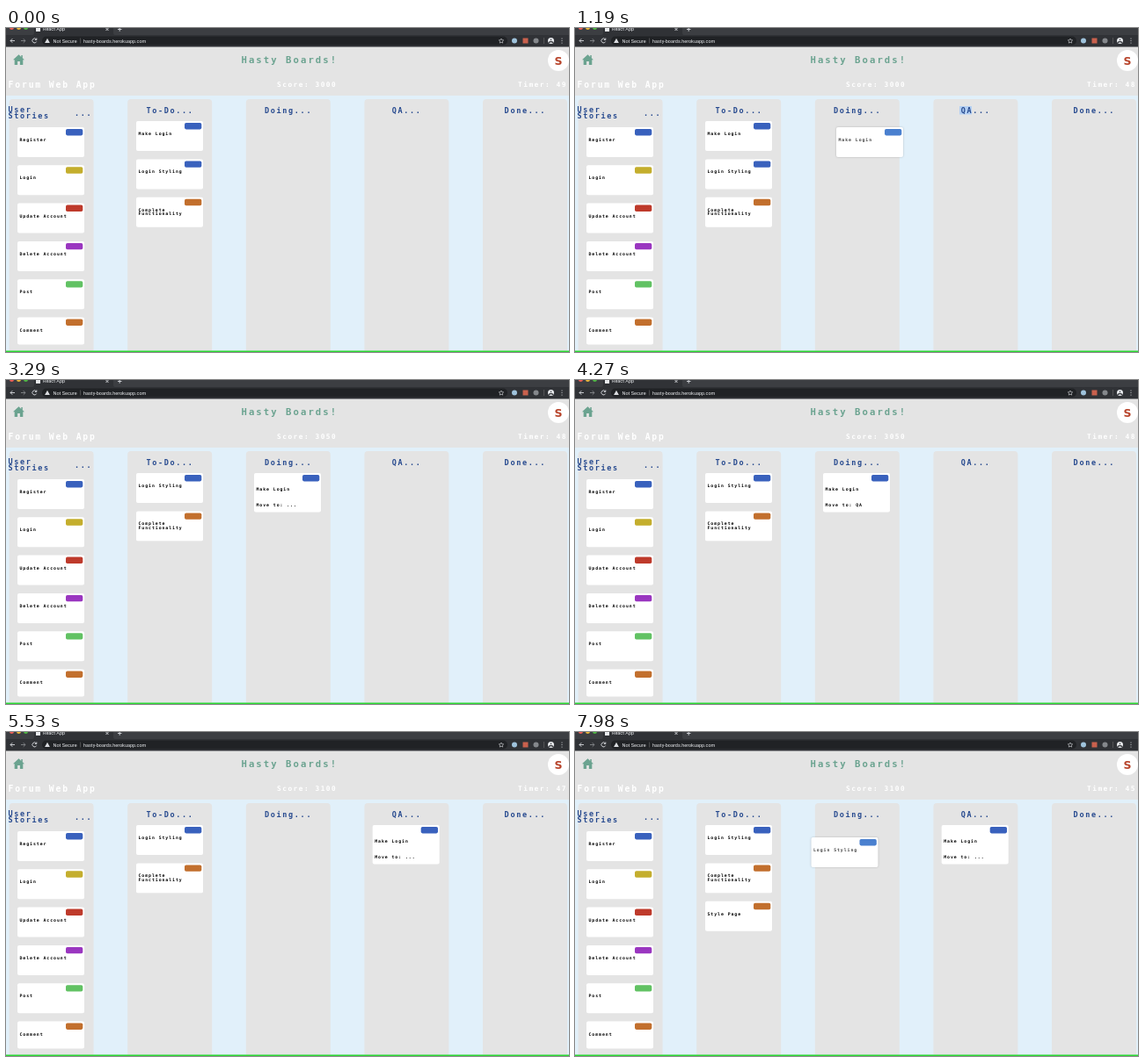
Animation, 640 px wide and 369 px high, one loop 8 s. Source, as an HTML page:

```html
<!DOCTYPE html>
<html lang="en">
<head>
<meta charset="utf-8">
<title>Task board</title>
<style>
html, body { margin: 0; width: 100%; height: 100%; overflow: hidden; background: #e1f0fa; }
svg { display: block; width: 100vw; height: 100vh; }
text { font: bold 4.85px "DejaVu Sans Mono", monospace; letter-spacing: .194em; white-space: pre; }
.ui { font: 5.5px Roboto, Arial, sans-serif; letter-spacing: 0; fill: #e8eaed; }
.brand { font-size: 10.6px; fill: #6ba390; }
.project { font-size: 9.7px; fill: #fff; }
.stat { font-size: 7.8px; fill: #fff; }
.heading { font-size: 8.5px; fill: #274a8f; }
.avatar { font: bold 12.5px "DejaVu Sans", sans-serif; letter-spacing: 0; fill: #b8452c; }
.ghost { filter: drop-shadow(0 0 1px #0003); }
.ghost text { fill: #444; }

.anim { animation: 8s step-end infinite; }
.drag { animation-timing-function: ease-in-out; }

/* Cards in the columns */
#first { animation-name: first; }
#rest { animation-name: rest; }
#added { animation-name: added; }
#doing { animation-name: doing; }
#qa { animation-name: qa; }
@keyframes first { 0% { visibility: visible } 18.2%, 100% { visibility: hidden } }
@keyframes rest { 0% { transform: none } 18.2%, 100% { transform: translateY(-43.4px) } }
@keyframes added { 0% { visibility: hidden } 79%, 100% { visibility: visible } }
@keyframes doing { 0% { visibility: hidden } 18.2% { visibility: visible } 62%, 100% { visibility: hidden } }
@keyframes qa { 0% { visibility: hidden } 62%, 100% { visibility: visible } }

/* Labels */
#wait { animation-name: wait; }
#ready { animation-name: ready; }
#mark { animation-name: mark; }
@keyframes wait { 0% { opacity: 1 } 45%, 100% { opacity: 0 } }
@keyframes ready { 0% { opacity: 0 } 45%, 100% { opacity: 1 } }
@keyframes mark { 0% { opacity: 0 } 7% { opacity: 1 } 18.2%, 100% { opacity: 0 } }

/* Dragged copies */
#drag1 { animation-name: drag1; }
#drag2 { animation-name: drag2; }
#drag3 { animation-name: drag3; }
@keyframes drag1 {
  0%, 6.99% { visibility: hidden; transform: translate(148px, 106px) }
  7% { visibility: visible; transform: translate(148px, 106px) }
  14.875%, 18.19% { visibility: visible; transform: translate(297px, 113px) }
  18.2%, 100% { visibility: hidden; transform: translate(297px, 113px) }
}
@keyframes drag2 {
  0%, 54.99% { visibility: hidden; transform: translate(282px, 106px) }
  55% { visibility: visible; transform: translate(282px, 106px) }
  61.99% { visibility: visible; transform: translate(425px, 113px) }
  62%, 100% { visibility: hidden; transform: translate(425px, 113px) }
}
@keyframes drag3 {
  0%, 91.99% { visibility: hidden; transform: translate(148px, 106px) }
  92% { visibility: visible; transform: translate(148px, 106px) }
  99.75%, 100% { visibility: visible; transform: translate(268.5px, 120px) }
}
</style>
</head>
<body>
<svg viewBox="0 0 640 369" preserveAspectRatio="none">
  <rect width="640" height="369" fill="#e1f0fa"/>

  <g id="browser">
    <rect width="640" height="22" fill="#3c3e42"/>
    <path d="M30 8q2 0 2-3V0h90v5q0 3 2 3H640V22H0V8z" fill="#303236"/>
    <rect x="41" y="9.5" width="529" height="10" rx="5" fill="#202225"/>
    <circle cx="6.5" cy="-.5" r="2.5" fill="#ee5f57"/>
    <circle cx="14.5" cy="-.5" r="2.5" fill="#e9b63a"/>
    <circle cx="22.5" cy="-.5" r="2.5" fill="#4fb844"/>
    <rect x="34" y="0" width="5" height="4" fill="#e8eaed"/>
    <text class="ui" x="42" y="3">React App</text>
    <g fill="none" stroke="#dadce0" stroke-width=".9">
      <path d="M113.5 0l3 3m0-3l-3 3M127 1.5h4.5M129.2 0v3.8"/>
      <path d="M10 14.5H5m2.3-2.3L5 14.500l2.3 2.3"/>
      <path d="M17 14.5h5m-2.3-2.3l2.3 2.3-2.3 2.3" stroke="#85888c"/>
      <path d="M34.5 13a2.5 2.5 0 1 0 .2 2.5M34.8 11.5v2h-2"/>
      <path d="M563 12l.8 1.7 1.9.2-1.4 1.3.4 1.9-1.7-.9-1.7.9.4-1.9-1.4-1.3 1.9-.2z" stroke-width=".6"/>
      <path d="M84.5 11.5v6M611.5 11v7" stroke="#777" stroke-width=".5"/>
    </g>
    <path d="M47 11.8l2.9 5.2h-5.8z" fill="#dadce0"/>
    <text class="ui" x="53.5" y="16.5">Not Secure</text>
    <text class="ui" x="88" y="16.5">hasty-boards.herokuapp.com</text>
    <circle cx="578" cy="14.5" r="3" fill="#9fc3dc"/>
    <rect x="587.5" y="11.5" width="6" height="6" fill="#c9614d"/>
    <circle cx="602.5" cy="14.5" r="3" fill="#85888c"/>
    <circle cx="619.5" cy="14.5" r="3.5" fill="#e8eaed"/>
    <path d="M617.3 16.5q2.200-2 4.400 0M619.5 13.200v.01" stroke="#3c3e42" stroke-width="1.5" stroke-linecap="round" fill="none"/>
    <path d="M632 12v.01M632 14.5v.01M632 17v.01" stroke="#dadce0" stroke-width="1.2" stroke-linecap="round"/>
  </g>

  <rect y="21.5" width="640" height="55.5" fill="#e4e4e4"/>
  <path d="M14.5 30.3L8 36.3h1.700v5.7h3.4v-3.9h2.8V42h3.4v-5.7H21l-2.2-2V31h-1.5v2z" fill="#6ba390"/>
  <text class="brand" x="267.5" y="40.2">Hasty Boards!</text>
  <circle cx="628" cy="37" r="12" fill="#fff"/>
  <text class="avatar" x="628" y="41.5" text-anchor="middle">S</text>
  <text class="project" x="2.5" y="67.8">Forum Web App</text>
  <text class="stat" x="308" y="67.2" id="score"></text>
  <text class="stat" x="582" y="67.2" id="timer"></text>

  <g id="columns"></g>
  <g id="board"></g>
  <rect y="367.5" width="640" height="1.5" fill="#2bd631"/>
</svg>

<script>
const NS = "http://www.w3.org/2000/svg";
const $ = id => document.getElementById(id);
const board = $("board"), columns = $("columns");
const colors = {
  blue: "#3961bd", lightBlue: "#4a80cf", yellow: "#c4ae2d", red: "#be3a2b",
  purple: "#9a36c0", green: "#61c263", orange: "#c26f2d"
};
const PITCH = 43.4;

function add(parent, tag, attrs = {}, content = "") {
  const el = document.createElementNS(NS, tag);
  for (const key in attrs) el.setAttribute(key, attrs[key]);
  el.textContent = content;
  parent.append(el);
  return el;
}

const group = (id, cls = "anim", parent = board) => add(parent, "g", { id, class: cls });

function card(parent, x, y, color, lines, height = 34) {
  const g = add(parent, "g", { transform: `translate(${x} ${y})` });
  add(g, "rect", { width: 76, height, rx: 2, fill: "#fff" });
  add(g, "rect", { x: 55, y: 2, width: 19.3, height: 7.4, rx: 1.8, fill: colors[color] });
  const top = height > 34 ? 20.1 : 16;
  lines.forEach((line, i) => add(g, "text", { x: 2.5, y: top + i * 4.3 }, line));
  return g;
}

function workCard(parent, x, y, color) {
  return card(parent, x, y, color, ["Make Login"], 44.5);
}

const moveTo = (parent, target, attrs) =>
  add(parent, "text", { x: 2.5, y: 37.5, ...attrs }, "Move to: " + target);

["", "To-Do...", "Doing...", "QA...", "Done..."].forEach((name, i) => {
  const x = 3.6 + i * 134.6;
  add(columns, "path", { d: `M${x} 367.5V85q0-4 4-4h88q4 0 4 4V367.5z`, fill: "#e4e4e4" });
  if (i === 3) add(columns, "rect", { id: "mark", class: "anim", x: 437, y: 89, width: 14, height: 9.5, fill: "#b4d0f3" });
  add(columns, "text", { class: "heading", x: x + 48.3, y: 96.7, "text-anchor": "middle" }, name);
});
[["User", 2.5, 96], ["Stories", 2.5, 103.3], ["...", 78, 99.8]].forEach(([s, x, y]) =>
  add(columns, "text", { class: "heading", x, y }, s));

// The story list cuts off its last card a little early
[["Register", "blue"], ["Login", "yellow"], ["Update Account", "red"],
 ["Delete Account", "purple"], ["Post", "green"], ["Comment", "orange", 31]].forEach(([name, color, height], i) =>
  card(board, 13, 113 + i * 43.3, color, [name], height));

card(group("first"), 148, 106, "blue", ["Make Login"]);
const rest = group("rest");
card(rest, 148, 106 + PITCH, "blue", ["Login Styling"]);
card(rest, 148, 106 + 2 * PITCH, "orange", ["Complete", "Functionality"]);
card(group("added"), 148, 106 + 2 * PITCH, "orange", ["Style Page"]);

const doing = workCard(group("doing"), 282, 106, "blue");
moveTo(doing, "...", { id: "wait", class: "anim" });
moveTo(doing, "QA", { id: "ready", class: "anim" });
moveTo(workCard(group("qa"), 416.7, 106, "blue"), "...");

const ghost = id => group(id, "anim drag ghost");
card(ghost("drag1"), 0, 0, "lightBlue", ["Make Login"]);
moveTo(workCard(ghost("drag2"), 0, 0, "lightBlue"), "QA");
card(ghost("drag3"), 0, 0, "lightBlue", ["Login Styling"]);

// Number of listed moments already passed
const passed = (t, times) => times.filter(at => t >= at).length;

// Counters share the clock of the CSS animations
const clock = $("first").getAnimations()[0];
function tick() {
  const t = (clock.currentTime || 0) % 8000;
  $("score").textContent = "Score: " + (3000 + 50 * passed(t, [1456, 4960]));
  $("timer").textContent = "Timer: " + (49 - passed(t, [1000, 4340, 5900, 7500]));
  requestAnimationFrame(tick);
}
tick();
</script>
</body>
</html>
```
